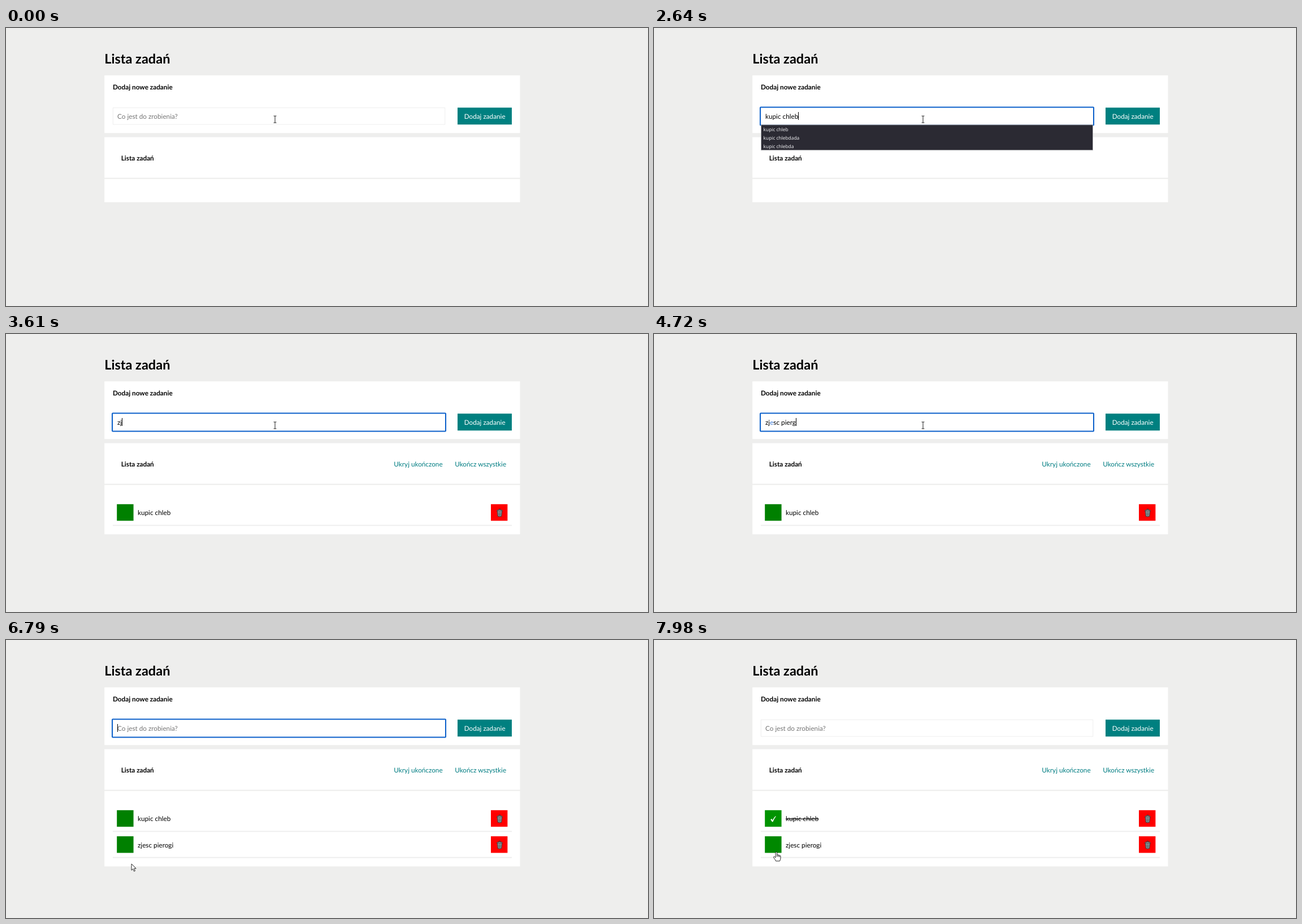
Recreate the animation shown at these times as an HTML page. Size 1136 by 493 pixels, loop 8 s.

```html
<!DOCTYPE html>
<html lang="pl">
<head>
<meta charset="utf-8">
<title>Lista zadań</title>
<style>
  html, body { margin: 0; width: 100%; height: 100%; overflow: hidden; background: #eeeeed; }
  svg { display: block; width: 1136px; height: 493px; }
  text { font: 11.76px Lato, sans-serif; white-space: pre; text-rendering: geometricPrecision; }
  .bold { font-weight: 700; }
  .title { font-size: 23.52px; }
  .link { fill: #007d82; }
  .menu text { font: 8.4px "Open Sans", sans-serif; fill: #fbfbfe; }
  .done { text-decoration: line-through; }
</style>
</head>
<body>
<svg viewBox="0 0 1136 493">
  <defs>
    <g id="bin" stroke="#333" stroke-width=".9" stroke-linejoin="round">
      <path d="M-4.3 -3.5 L-3.2 6.3 Q0 7.5 3.2 6.3 L4.3 -3.5Z" fill="#9aa5a8"/>
      <path d="M-2 -2 L-1.4 5.8 M0 -2 V6 M2 -2 L1.4 5.8 M-3.6 .7 H3.6 M-3.2 3.4 H3.2" fill="none" stroke="#526064" stroke-width=".7"/>
      <path d="M-5.2 -3.2 Q-5 -5.2 0 -5.4 Q5 -5.2 5.2 -3.2Z" fill="#b4bdbf"/>
      <path d="M-1.5 -5.4 V-6.5 H1.5 V-5.4" fill="none"/>
    </g>
  </defs>

  <text class="bold title" x="174.2" y="62.8">Lista zadań</text>

  <g fill="#fff">
    <rect x="174.2" y="84" width="735.3" height="102.2"/>
    <rect x="174.2" y="193.6" width="735.3" height="72"/>
    <rect id="card" x="174.2" y="267.8" width="735.3"/>
  </g>

  <text class="bold" x="189" y="109.3">Dodaj nowe zadanie</text>
  <rect id="box" fill="#fff"/>
  <text id="entry" x="197" y="161"></text>
  <rect id="caret" y="149" width="1" height="14"/>
  <rect x="799" y="141.2" width="96" height="30" fill="teal"/>
  <text x="810.7" y="161" fill="#fff">Dodaj zadanie</text>

  <text class="bold" x="203.7" y="234.6">Lista zadań</text>
  <g id="links">
    <text class="link" x="686.3" y="234.6">Ukryj ukończone</text>
    <text class="link" x="794.2" y="234.6">Ukończ wszystkie</text>
  </g>
  <g id="tasks"></g>
  <g id="menu" class="menu"></g>

  <g id="cursor" stroke-linejoin="round">
    <path id="beam" d="M-2.5 -6 H-.7 L0 -5.4 L.7 -6 H2.5 M0 -5.4 V5.4 M-2.5 6 H-.7 L0 5.4 L.7 6 H2.5" fill="none" stroke="#333" stroke-width="1.1"/>
    <path id="arrow" d="M0 0 V11.3 L2.6 8.9 L4.5 13.2 L6.4 12.4 L4.6 8.2 H8.1Z" fill="#fff" stroke="#111" stroke-width=".9"/>
    <path id="hand" d="M-1.4 10 V1.2 Q-1.3 0 0 0 Q1.2 0 1.3 1.2 V5.2 Q2.4 4.2 3.6 5.5 Q4.9 4.8 5.7 6.2 Q7.4 5.8 7.5 7.6 V11 Q7.4 13.2 6 16 H-1 Q-1.5 14 -4.5 10.2 Q-5.6 8.4 -4.2 8 Q-3 7.8 -1.4 10Z M1.3 5.2 V8.5 M3.6 5.5 V8.7 M5.7 6.2 V9" fill="#fff" stroke="#111" stroke-width=".9"/>
  </g>
</svg>

<script>
const LOOP = 8000, PITCH = 46.3, BLUR = 7450;
const $ = id => document.getElementById(id);
const show = (el, on) => el.setAttribute('visibility', on ? 'visible' : 'hidden');
const set = (el, attrs) => { for (const k in attrs) el.setAttribute(k, attrs[k]); };
const ramp = (t, a, b) => Math.min(1, Math.max(0, (t - a) / (b - a)));
const within = (t, a, b) => t >= a && t < b;

// Latest value of a list of [time, value] steps.
const stepAt = (steps, t) => steps.reduce((v, s) => t >= s[0] ? s[1] : v, steps[0][1]);

// One step per keystroke.
const typing = (word, times) => times.map((time, i) => [time, word.slice(0, i + 1)]);

const entrySteps = [
  [0, ''],
  ...typing('kupic chleb', [1330, 1470, 1670, 1840, 1930, 2010, 2180, 2260, 2340, 2480, 2640]),
  [2800, ''],
  ...typing('zjesc pierg', [3410, 3610, 3700, 3790, 3950, 4020, 4090, 4250, 4290, 4460, 4720]),
  [4990, 'zjesc pier'], [5260, 'zjesc piero'], [5420, 'zjesc pierog'], [5550, 'zjesc pierogi'],
  [5780, '']
];
const caretSteps = [
  [0, false], [30, true], [770, false], [1300, true], [2870, false], [3610, true],
  [6050, false], [6580, true], [7110, false]
];
const menuSteps = [
  [0, []], [1400, ['kupic chleb', 'kupic chlebdada', 'kupic chlebda']], [2800, []],
  [3470, ['zrobic obiad']], [3610, []]
];
const cursorPath = [
  [6230, 476, 162], [6350, 466, 74], [6500, 466, 74], [6540, 475, 62], [6620, 611, 130],
  [6700, 450, 300], [6790, 222, 397], [6900, 226, 396], [7300, 232, 336], [7380, 214, 318],
  [7650, 214, 318], [7960, 216.5, 376]
];

function cursorAt(t) {
  let i = 1;
  while (i < cursorPath.length - 1 && t > cursorPath[i][0]) i++;
  const [a, b] = [cursorPath[i - 1], cursorPath[i]];
  const p = ramp(t, a[0], b[0]);
  return [a[1] + (b[1] - a[1]) * p, a[2] + (b[2] - a[2]) * p];
}

const tasks = [['kupic chleb', 2800], ['zjesc pierogi', 5780]].map(([label, from], i) => {
  const g = document.createElementNS('http://www.w3.org/2000/svg', 'g');
  g.setAttribute('transform', `translate(0 ${i * PITCH})`);
  g.innerHTML = `
    <rect class="toggle" x="196.2" y="301.8" width="29.4" height="29.4"/>
    <path class="tick" d="M206.3 318.2 L208.2 317 L209.8 319.6 Q212 315 215 312.3 L215.8 312.8 Q212.4 317 210.4 322.6 H209Z" fill="#fff"/>
    <text class="label" x="233" y="321.4">${label}</text>
    <rect x="858" y="301.8" width="29.4" height="29.4" fill="red"/>
    <use href="#bin" x="873.5" y="317"/>
    <rect x="189" y="338.4" width="706" height="2" fill="#eee"/>`;
  $('tasks').append(g);
  const part = name => g.querySelector('.' + name);
  return { g, from, toggle: part('toggle'), tick: part('tick'), label: part('label') };
});

function drawEntry(t) {
  const focused = within(t, 30, BLUR);
  set($('box'), focused
    ? { x: 188, y: 140.5, width: 590, height: 32, rx: 1, stroke: '#0a5fca', 'stroke-width': 2 }
    : { x: 189.3, y: 141.5, width: 587.5, height: 29.5, rx: 0, stroke: '#eee', 'stroke-width': 1 });

  const value = stepAt(entrySteps, t), entry = $('entry');
  entry.textContent = value || 'Co jest do zrobienia?';
  entry.setAttribute('fill', value ? '#000' : '#757575');
  const width = value ? entry.getComputedTextLength() : 0;
  if (value.startsWith('zje')) {
    entry.innerHTML = `zj<tspan fill="#3d78d2">e</tspan>${value.slice(3)}`;
  }
  $('caret').setAttribute('x', Math.round(197 + width));
  show($('caret'), focused && stepAt(caretSteps, t));
}

function drawMenu(t) {
  const items = stepAt(menuSteps, t);
  $('menu').innerHTML = !items.length ? '' :
    `<rect x="189.5" y="171.8" width="587" height="${items.length * 14.7 + .8}" fill="#2b2a33" stroke="#b5b5b8" stroke-width=".8"/>` +
    items.map((s, i) => `<text x="193.6" y="${183.2 + i * 14.7}">${s}</text>`).join('');
}

function drawTasks(t) {
  const count = tasks.filter(task => t >= task.from).length;
  $('card').setAttribute('height', count ? 41 + count * PITCH : 41.2);
  if (count) $('card').setAttribute('height', 87.4 + (count - 1) * PITCH);
  show($('links'), count > 0);
  const glow = [
    25 * ramp(t, 7330, 7650) - 7 * ramp(t, 7780, 8000),
    10 * ramp(t, 7880, 8000)
  ];
  tasks.forEach((task, i) => {
    const checked = i === 0 && t >= BLUR;
    task.g.setAttribute('display', t >= task.from ? 'inline' : 'none');
    task.toggle.setAttribute('fill', `rgb(0 ${Math.round(128 + glow[i])} 0)`);
    task.tick.setAttribute('display', checked ? 'inline' : 'none');
    task.label.classList.toggle('done', checked);
  });
}

function drawCursor(t) {
  const [x, y] = cursorAt(t);
  const overToggle = t > 7300 && x < 225.6 && (y < 331.2 || y > 348);
  const overInput = t < 6600 && y > 141;
  $('cursor').setAttribute('transform', `translate(${x} ${y})`);
  show($('beam'), overInput);
  show($('hand'), overToggle);
  show($('arrow'), !overInput && !overToggle);
}

const start = performance.now();
function frame() {
  const t = (performance.now() - start) % LOOP;
  drawEntry(t);
  drawMenu(t);
  drawTasks(t);
  drawCursor(t);
  requestAnimationFrame(frame);
}
frame();
</script>
</body>
</html>
```
